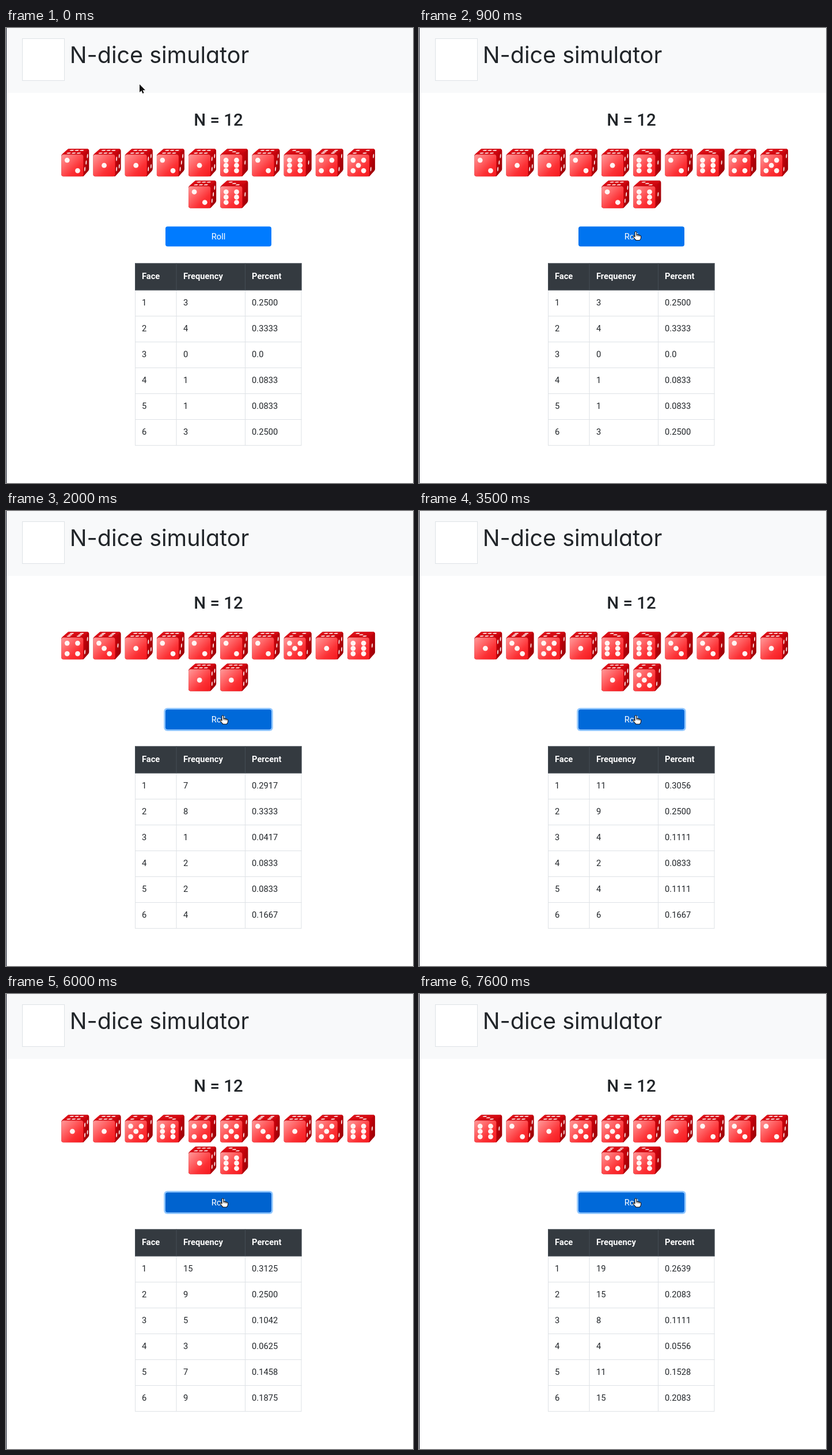
Animation, 707 px wide and 792 px high, one loop 8000 ms. Source, as an HTML page with a canvas:

```html
<!DOCTYPE html>
<html lang="en">
<head>
<meta charset="utf-8">
<title>N-dice simulator</title>
<style>
html, body { margin: 0; width: 100%; height: 100%; overflow: hidden; background: #fff; }
canvas, svg { position: absolute; left: 0; top: 0; display: block; }
.title { font: 400 39.5px Inter, sans-serif; font-optical-sizing: none; font-feature-settings: "cv11"; fill: #212529; }
</style>
</head>
<body>
<canvas id="stage" width="707" height="792"></canvas>
<svg width="707" height="112"><text class="title" x="110.8" y="60.5">N-dice simulator</text></svg>
<script>
const ctx = document.getElementById('stage').getContext('2d');
const LOOP = 8000, STEP = 100, CENTER = 369;

// Each click: press time, moment the dice change, pressed amount per step.
const clicks = [
  { at: 1800, roll: 1900, press: [.7, .6] },
  { at: 3200, roll: 3400, press: [.7, 1, .5] },
  { at: 4500, roll: 4600, press: [.7, .6] },
  { at: 6000, roll: 6100, press: [.8, .6] },
  { at: 7400, roll: 7500, press: [.8, .6] }
];
const rolls = ['211216264526', '431222251611', '135166332115',
               '115645315616', '566136223615', '621552123246']
  .map(r => [...r].map(Number));

// A percentage is refreshed only when its face comes up.
function tally(last) {
  const rows = Array.from({ length: 6 }, () => ({ count: 0, percent: '0.0' }));
  for (let i = 0; i <= last; i++) {
    rolls[i].forEach(face => rows[face - 1].count++);
    new Set(rolls[i]).forEach(face => {
      const row = rows[face - 1];
      row.percent = (row.count / (12 * (i + 1))).toFixed(4);
    });
  }
  return rows;
}
const tables = rolls.map((_, i) => tally(i));

function text(str, x, y, font, color = '#212529', align = 'left') {
  ctx.font = font + ' Roboto, sans-serif';
  ctx.fillStyle = color;
  ctx.textAlign = align;
  ctx.fillText(str, x, y);
}

function rect(x, y, w, h, color) {
  ctx.fillStyle = color;
  ctx.fillRect(x, y, w, h);
}

function roundRect(x, y, w, h, r, color) {
  ctx.fillStyle = color;
  ctx.beginPath();
  ctx.roundRect(x, y, w, h, r);
  ctx.fill();
}

function mix(a, b, k) {
  return `rgb(${a.map((v, i) => Math.round(v + (b[i] - v) * k))})`;
}

function pips(n) {
  const a = .26, b = .5, c = .74, list = [];
  if (n % 2) list.push([b, b]);
  if (n > 1) list.push([a, a], [c, c]);
  if (n > 3) list.push([c, a], [a, c]);
  if (n === 6) list.push([a, b], [c, b]);
  return list;
}

// A face is a unit square sheared into place by its matrix.
function dieFace(matrix, spots, radius, colors) {
  ctx.save();
  ctx.transform(...matrix);
  const fill = ctx.createLinearGradient(0, 0, 1, 1);
  colors.forEach((c, i) => fill.addColorStop(i / (colors.length - 1), c));
  roundRect(0, 0, 1, 1, .1, fill);
  ctx.fillStyle = '#fff4f2';
  for (const [u, v] of spots) {
    ctx.beginPath();
    ctx.arc(u, v, radius, 0, 7);
    ctx.fill();
  }
  ctx.restore();
}

const topPips = [0, 6, 6, 6, 6, 4, 3], sidePips = [0, 4, 3, 1, 2, 2, 1];
const body = new Path2D('M2 12L13 2H46L47 4V36L38 47H3L2 46Z');

function die(x, y, n) {
  const top = pips(topPips[n]).map(([u, v]) => n < 3 ? [v, u] : [u, v]);
  const side = pips(sidePips[n]).map(([u, v]) => [1 - u, v]);
  ctx.save();
  ctx.translate(x, y);
  ctx.fillStyle = ctx.strokeStyle = '#c00810';
  ctx.lineWidth = 3;
  ctx.lineJoin = 'round';
  ctx.fill(body);
  ctx.stroke(body);
  dieFace([36, 0, -11, 9.5, 12, 1], top, .095, ['#e2141c', '#c90009']);
  dieFace([9.5, -10, 0, 37, 38.7, 11], side, .1, ['#cf000b', '#940006']);
  dieFace([38, 0, 0, 38, .5, 10.5], pips(n), .115, ['#ff9a9a', '#ff6668', '#fc3034', '#f5181d']);
  ctx.restore();
}

function drawDice(roll) {
  roll.forEach((n, i) => {
    const second = i > 9;
    die((second ? 316.7 - 552 : 95.8) + i * 55.2, second ? 264.9 : 209.7, n);
  });
}

function drawTable(rows) {
  const cols = [224, 295.5, 415, 512.5], textX = [236, 308, 427];
  const top = 409.5, width = 289.5;
  rect(224, top, width, 47, '#343a40');
  for (const x of cols) {
    rect(x, top, 1, 47, '#454d55');
    rect(x, top + 47, 1, 269.5, '#dee2e6');
  }
  rect(224, top, width, 1, '#454d55');
  rect(224, top + 46, width, 1, '#454d55');
  ['Face', 'Frequency', 'Percent'].forEach((s, i) => text(s, textX[i], 437, '700 14.7px', '#fff'));
  rows.forEach((row, r) => {
    rect(224, 501 + r * 45, width, 1, '#dee2e6');
    [r + 1, row.count, row.percent].forEach((s, i) => text(s, textX[i], 483 + r * 45, '400 14.7px'));
  });
}

function drawButton(t) {
  const hover = t < 900 ? 0 : t < 1000 ? .4 : t < 1100 ? .9 : 1;
  const click = clicks.filter(c => c.at <= t).pop();
  const press = click ? click.press[(t - click.at) / STEP] || 0 : 0;
  if (click) {
    const ring = t === clicks[0].at ? .35 : .5;
    roundRect(274.2, 342.7, 189.6, 40.2, 6, `rgba(38,143,255,${ring})`);
  }
  const color = press ? mix([0, 105, 217], [0, 98, 204], press)
                      : mix([0, 123, 255], [0, 105, 217], hover);
  roundRect(277, 345.6, 184, 34.6, 3.7, color);
  text('Roll', CENTER, 367.7, '400 14.7px', '#fff', 'center');
}

const arrow = new Path2D('M0 0V14L3.2 11L5.4 16L7.6 15L5.5 10.3H10Z');
const hand = new Path2D('M4 2Q5.5-.5 7 2V6.5Q8.5 5.5 9.5 7Q11 6 12 7.6Q14 7 14.5 9V12Q14 15 12 16H6Q3 13 .8 9.8Q.5 7.8 2.5 8.5L4 10Z');
const fingers = new Path2D('M7 6.5V9M9.5 7V9.5M12 7.6V10');

function drawCursor(t) {
  ctx.save();
  ctx.lineJoin = 'round';
  if (t < 900) {
    const k = t / 900, ease = k * k * (3 - 2 * k);
    ctx.translate(232 + 145 * ease, 98 + 255 * ease);
    ctx.lineWidth = 1.6;
    ctx.strokeStyle = '#fff';
    ctx.stroke(arrow);
    ctx.fillStyle = '#111';
    ctx.fill(arrow);
  } else {
    ctx.translate(371, t < 1000 ? 353.5 : 355);
    ctx.fillStyle = '#fff';
    ctx.fill(hand);
    ctx.lineWidth = 1.1;
    ctx.strokeStyle = '#111';
    ctx.stroke(hand);
    ctx.lineWidth = .8;
    ctx.stroke(fingers);
  }
  ctx.restore();
}

function draw(t) {
  const index = clicks.filter(c => c.roll <= t).length;
  rect(0, 0, 707, 792, '#fff');
  rect(0, 0, 707, 113, '#f8f9fa');
  rect(0, 0, 1, 792, '#161b2b');
  rect(28, 18, 74, 74, '#dee2e6');
  rect(29, 19, 72, 72, '#fff');
  text('N = 12', CENTER, 170, '500 29.4px', '#212529', 'center');
  drawDice(rolls[index]);
  drawButton(t);
  drawTable(tables[index]);
  drawCursor(t);
}

function tick() {
  draw(Math.floor(performance.now() % LOOP / STEP) * STEP);
  requestAnimationFrame(tick);
}
tick();
</script>
</body>
</html>
```
